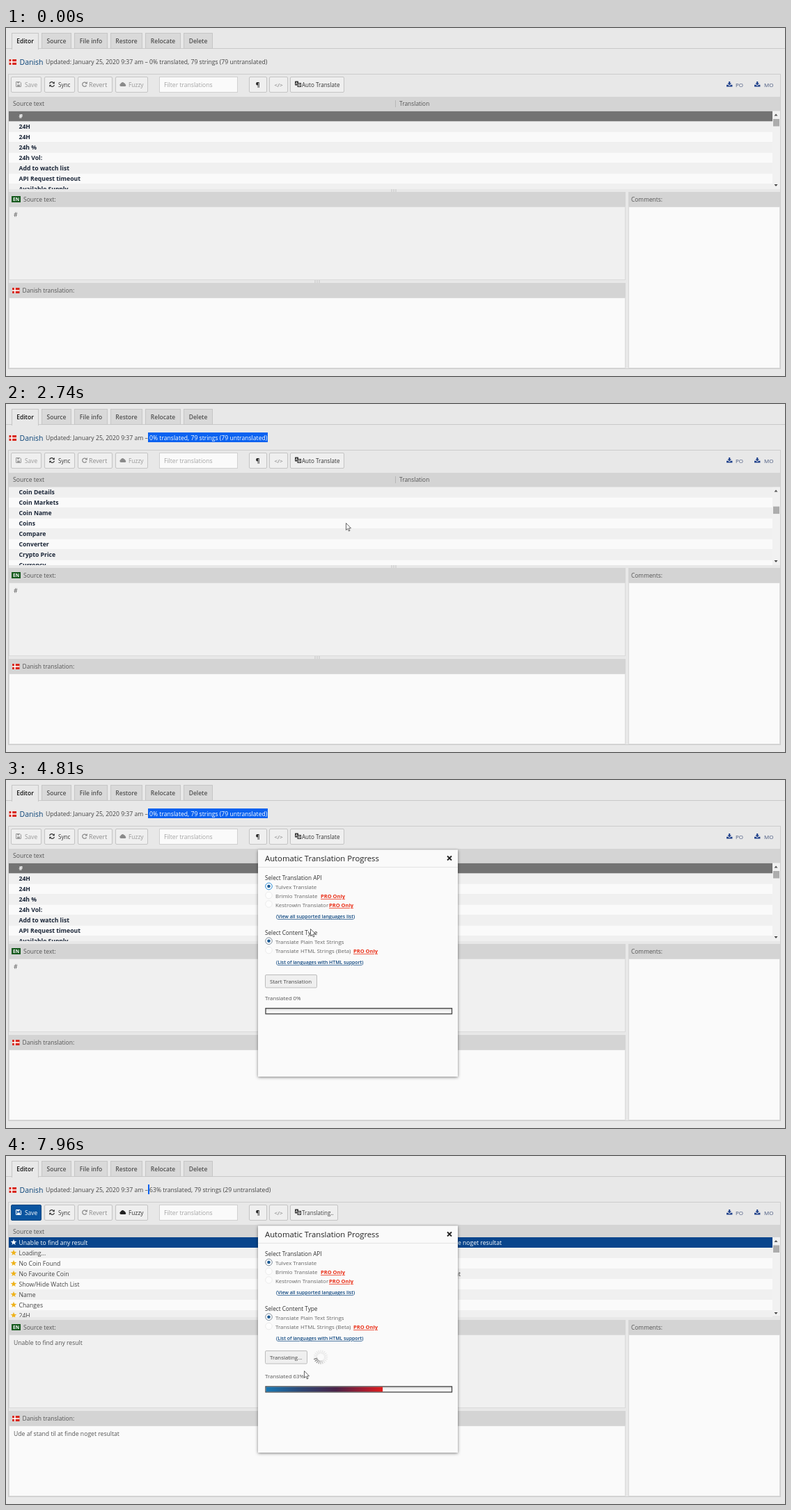
An HTML page for the animation above (8 s loop, 1119 by 501 pixels).

```html
<!DOCTYPE html>
<html lang="en">
<head>
<meta charset="utf-8">
<title>Translation editor</title>
<style>
  html, body { margin: 0; width: 100%; height: 100%; overflow: hidden; background: #e8e8e8; }
  svg { display: block; width: 1119px; height: 501px; font: 8.65px "Open Sans", "Noto Sans", sans-serif; fill: #555; }
  .b { font-weight: 700; fill: #1a2537; }
  .pro { font: 700 7.5px "Open Sans", sans-serif; fill: #ea2c14; text-decoration: underline; }
  .link { font-weight: 600; font-size: 6.9px; fill: #0b457f; }
  .link tspan { text-decoration: underline; }
  .opt { font-size: 7.95px; fill: #666; }
  .cap { font-size: 8.2px; fill: #333; }
</style>
</head>
<body>
<svg id="stage" viewBox="0 0 1119 501" xmlns="http://www.w3.org/2000/svg"></svg>
<script>
const LOOP = 8000, STEP = 70;
const CLICK = 3610, POPUP = 3740, START = 5470, BUSY = 5540, DONE = 6650;

const text = (x, y, s, attrs = '') => `<text x="${x}" y="${y}" ${attrs}>${s}</text>`;
const fill = (x, y, w, h, c, attrs = '') => `<rect x="${x}" y="${y}" width="${w}" height="${h}" fill="${c}" ${attrs}/>`;
const box = (x, y, w, h, c, line, attrs = '') =>
  fill(x + .5, y + .5, w - 1, h - 1, c, `stroke="${line}" ${attrs}`);
const path = (d, attrs) => `<path d="${d}" ${attrs}/>`;
const group = (id, ...parts) => `<g id="${id}">${parts.join('')}</g>`;
const at = (x, y, ...parts) => `<g transform="translate(${x} ${y})">${parts.join('')}</g>`;
const line = (c, w = 1) => `fill="none" stroke="${c}" stroke-width="${w}"`;

// icons
const flag = (x, y) => at(x, y, fill(0, 0, 10.5, 8, '#d8281c'),
  fill(3, 0, 1.6, 8, '#fff'), fill(0, 3.2, 10.5, 1.6, '#fff'));
const disk = (x, y, c) => at(x, y,
  path('M.5 .5H6L7.5 2V7.5H.5Z', line(c)), fill(2, .5, 3, 2, c), fill(2, 4.5, 4, 3, c));
const cycle = (x, y, c) => at(x, y,
  path('M.6 3.2A3.2 3.2 0 0 1 6.4 2M7.4 4.8A3.2 3.2 0 0 1 1.6 6', line(c, 1.2)),
  path('M7.8 0V3.2H4.6ZM.2 8V4.8H3.4Z', `fill="${c}"`));
const undo = (x, y, c) => at(x, y,
  path('M6.6 5.6A3.1 3.1 0 1 1 6 1.9', line(c, 1.2)), path('M7.8 0V3.4H4.4Z', `fill="${c}"`));
const cloud = (x, y, c) => at(x, y,
  path('M2 7A2 2 0 0 1 1.6 3.2A2.8 2.8 0 0 1 6.6 2.3A2 2 0 0 1 8.4 4A1.6 1.6 0 0 1 8 7Z', `fill="${c}"`));
const lang = (x, y) => at(x, y, fill(0, 0, 5, 6, '#333', 'rx=".6"'),
  path('M1.2 4.6L2.5 1.4L3.8 4.6M1.7 3.6H3.3', line('#fff', .7)),
  box(3.5, 2.5, 5.5, 6, '#f4f4f4', '#333'), path('M5 4.6H7.6M5 7L7 4.6M5.4 5.2L7.4 7', line('#333', .7)));
const download = (x, y) => at(x, y,
  path('M3.2 0H5.2V2.6H7L4.2 5.4L1.4 2.6H3.2ZM0 4.8H2L4.2 6.6L6.4 4.8H8.4V7.6H0Z', 'fill="#1d3f8a"'));
const star = (x, y, c) => {
  const pts = Array.from({ length: 10 }, (_, i) => {
    const a = i * Math.PI / 5, r = i % 2 ? 1.9 : 4.6;
    return (x + r * Math.sin(a)).toFixed(2) + ',' + (y - r * Math.cos(a)).toFixed(2);
  });
  return `<polygon points="${pts.join(' ')}" fill="${c}"/>`;
};

const tab = ([name, x, w], i) =>
  box(x, 7, w, i ? 23 : 24, i ? '#d9d9d9' : '#e8e8e8', '#c6c6c6') +
  (i ? '' : fill(x + 1, 29, w - 2, 2, '#e8e8e8')) +
  text(x + w / 2, 21.5, name, `text-anchor="middle" font-weight="600" font-size="8.5" fill="${i ? '#505050' : '#111'}"`);
const tabs = [['Editor', 8, 39], ['Source', 51, 43], ['File info', 98, 48],
  ['Restore', 150, 46], ['Relocate', 200, 51], ['Delete', 255, 42]];

const button = (x, w, attrs = '') => box(x, 70, w, 23, '#efefef', '#c4c4c4', `rx="1.5" ${attrs}`);
const label = (x, s, c = '#333', size = 8.4) => text(x, 85, s, `font-size="${size}" fill="${c}"`);

const titleHead = 'Updated: January 25, 2020 9:37 am – ';
const titleText = (id, s, attrs) => text(57, 52, titleHead + s, `id="${id}" ${attrs}`);

const words = ['#', '24H', '24H', '24h %', '24h Vol:', 'Add to watch list', 'API Request timeout',
  'Available Supply', 'Bid', 'Change', 'Changes', 'Chart', 'Circulating Supply', 'Close', 'Coin',
  'Coin Details', 'Coin Markets', 'Coin Name', 'Coins', 'Compare', 'Converter', 'Crypto Price',
  'Currency', 'Currency Not Found', 'Date', 'down', 'Enter Amount', 'Entries', 'Exchanges', 'Explorer',
  'Fernhill', 'Fiat Price', 'From', 'Global Data', 'High', 'Historical Data', 'Last Updated', 'Loading...', 'Low'];
const row = (s, i) => fill(4, 119.5 + i * 15, 1097, 15, i ? (i % 2 ? '#f0f0f0' : '#fafafa') : '#737373') +
  text(18.5, 130 + i * 15, s, `class="b" ${i ? '' : 'style="fill:#fff"'}`);
const results = ['Unable to find any result', 'Loading...', 'No Coin Found', 'No Favourite Coin',
  'Show/Hide Watch List', 'Name', 'Changes', '24H'];
const resultRow = (s, i) => fill(4, 117 + i * 15, 1097, 15, i ? (i % 2 ? '#f0f0f0' : '#fafafa') : '#08458c') +
  star(11, 124.3 + i * 15, i ? '#eeb21a' : '#fff') +
  text(18.5, 127.8 + i * 15, s, `fill="${i ? '#444' : '#fff'}"`);
const danish = 'Ude af stand til at finde noget resultat';

const grip = (x, y) => path(`M${x} ${y}h9M${x} ${y + 2}h9`, 'stroke="#bbb" stroke-width=".8" stroke-dasharray="2 1"');
const bar = (x, y, w) => fill(x, y, w, 21, '#d4d4d4');

const radio = (y, on, id = '') => `<circle cx="377.5" cy="${y}" r="4.8" fill="#fdfdfd" stroke="${on ? '#7e8b98' : '#ececec'}" ${id}/>` +
  (on ? `<circle cx="377.5" cy="${y}" r="2.3" fill="#1d5b94"/>` : '');
const option = (y, s, proX) => text(387, y, s, 'class="opt"') + (proX ? text(proX, y, 'PRO Only', 'class="pro"') : '');
const link = (y, s, id = '') => text(388, y, `(<tspan>${s}</tspan>)`, `class="link" ${id}`);

const spokes = 20;
const spinner = Array.from({ length: spokes }, (_, i) =>
  `<line x1="5" x2="10.3" stroke="#444" stroke-width="1.2" transform="rotate(${i * 360 / spokes})"/>`).join('');

const stage = document.getElementById('stage');
stage.innerHTML = [
  `<defs>
    <clipPath id="listClip"><rect x="4" y="117" width="1108" height="115"/></clipPath>
    <clipPath id="selClip"><rect id="selShape" x="204" y="41" width="0" height="14"/></clipPath>
    <linearGradient id="heat"><stop offset="0" stop-color="#1878b4"/><stop offset=".28" stop-color="#2b4a78"/>
      <stop offset=".6" stop-color="#4a2348"/><stop offset=".85" stop-color="#a81c30"/><stop offset="1" stop-color="#e01c1c"/></linearGradient>
    <linearGradient id="trough" x2="0" y2="1"><stop offset="0" stop-color="#d8d8d8"/><stop offset=".6" stop-color="#fafafa"/></linearGradient>
    <filter id="shade" x="-5%" y="-5%" width="110%" height="110%"><feDropShadow dx="0" dy="1" stdDeviation="2" flood-opacity=".5"/></filter>
  </defs>`,
  fill(0, 0, 1119, 501, '#e8e8e8'),
  fill(0, 29, 1119, 1, '#c9c9c9'), ...tabs.map(tab),

  flag(4.5, 45), text(19.5, 53, 'Danish', 'font-size="10.5" fill="#0b4478"'),
  titleText('title', '0% translated, 79 strings (79 untranslated)', 'fill="#444"'),
  fill(204, 41, 0, 14, '#0a62f0', 'id="sel"'),
  `<g clip-path="url(#selClip)">${titleText('titleSel', '0% translated, 79 strings (79 untranslated)', 'fill="#fff"')}</g>`,

  box(3, 66, 1110, 425, '#e8e8e8', '#cdcdcd'),
  button(7, 44), button(55, 44), button(103, 50), button(157, 47),
  group('toolsOff', disk(14, 77, '#999'), label(27, 'Save', '#999'), cloud(163, 77, '#8a8a8a'), label(176, 'Fuzzy', '#999')),
  group('toolsOn', box(7, 70, 44, 23, '#0a55a0', '#084680', 'rx="1.5"'), disk(14, 77, '#fff'), label(27, 'Save', '#fff'),
    cloud(163, 77, '#222'), label(176, 'Fuzzy')),
  cycle(62, 77, '#333'), label(75, 'Sync', '#333', 8.1), undo(109, 77, '#888'), label(119, 'Revert', '#8c8c8c', 8.8),
  box(220, 70, 113, 23, '#fafafa', '#d0d0d0'), label(227, 'Filter translations', '#a4a4a4', 8.6),
  button(349, 26), text(361.5, 85, '¶', 'text-anchor="middle" font-weight="700" fill="#222"'),
  button(378, 27), text(391.5, 84.5, '&lt;/&gt;', 'text-anchor="middle" font-size="8" fill="#777"'),
  group('auto', button(408, 78, 'id="autoBox"'), label(425, 'Auto Translate', '#333', 8.1)),
  group('autoBusy', button(408, 69), label(425, 'Translating..', '#444', 8.1)),
  lang(415, 76.5),
  download(1035, 77), text(1048, 85, 'PO', 'font-size="8" fill="#4a5a80"'),
  download(1075, 77), text(1089, 85, 'MO', 'font-size="8" fill="#4a5a80"'),

  fill(4, 99, 1108, 20.5, '#d4d4d4'), text(10, 111.5, 'Source text'),
  fill(559, 104, 1, 10, '#b8b8b8'), text(565, 111.5, 'Translation', 'font-size="8.4"'),
  `<g clip-path="url(#listClip)">`,
  `<g id="listBox" style="clip-path:inset(0)"><g id="list">${words.map(row).join('')}</g></g>`,
  group('results', ...results.map(resultRow),
    text(712, 127.8, danish, 'text-anchor="end" fill="#fff"'),
    text(653, 172.8, 'Ingen favorit mønt', 'text-anchor="end" fill="#444"')),
  `</g>`,
  group('headCover', fill(4, 99, 1108, 20.5, '#d4d4d4'), text(10, 111.5, 'Source text'),
    fill(559, 104, 1, 10, '#b8b8b8'), text(565, 111.5, 'Translation', 'font-size="8.4"')),
  fill(1101, 119.5, 11, 113, '#f1f1f1', 'id="track"'),
  path('M1103.5 126.5h5l-2.5-3z', 'id="up" fill="#555"'), path('M1103.5 225h5l-2.5 3z', 'fill="#444"'),
  fill(1102, 131, 9, 10.5, '#adadad', 'id="thumb"'),
  fill(4, 232, 1108, 4, '#e8e8e8'), grip(553, 233),

  bar(4, 236, 886), fill(8, 242, 13, 9, '#14591c'),
  text(14.5, 249, 'EN', 'text-anchor="middle" font-size="6.6" font-weight="700" fill="#fff"'),
  text(25, 249.5, 'Source text:', 'font-size="8.5"'),
  box(4, 257, 886, 106, '#f0f0f0', '#dadada'), text(11, 271.7, '#', 'id="phrase"'),
  grip(443, 364),
  bar(4, 367, 886), flag(9, 374), text(23.5, 381, 'Danish translation:', 'font-size="8.5"'),
  box(4, 388, 886, 102, '#fafafa', '#dadada'), text(11, 403, danish, 'id="answer"'),
  bar(894, 236, 218), text(898, 249.5, 'Comments:', 'font-size="8.4"'),
  box(894, 257, 218, 233, '#fafafa', '#dadada'),

  group('popup',
    fill(362, 100.5, 287, 326.5, '#fafafa', 'filter="url(#shade)"'),
    text(372, 116.5, 'Automatic Translation Progress', 'font-size="11.3" fill="#222"'),
    path('M634 109.5l6 6m0-6l-6 6', line('#222', 1.8)), fill(362, 125, 287, 1, '#e4e4e4'),
    text(372, 144.3, 'Select Translation API', 'class="cap"'),
    radio(153, true, 'id="focus"'), radio(166, false), radio(178.5, false),
    option(157, 'Tulvex Translate'), option(170, 'Brimlo Translate', 452), option(183, 'Kestrowin Translator', 464),
    link(199, 'View all supported languages list'),
    text(372, 223, 'Select Content Type', 'class="cap"'),
    radio(231.7, true), radio(245, false),
    option(236, 'Translate Plain Text Strings'), option(249, 'Translate HTML Strings (Beta)', 499),
    link(265.3, 'List of languages with HTML support', 'id="hot"'),
    box(372, 280, 75, 19.5, '#efefef', '#bdbdbd', 'id="go" rx="1.5"'),
    text(379, 293, 'Start Translation', 'id="goText" font-size="7.85" fill="#444"'),
    `<g id="spin" transform="translate(452 289.5)">${spinner}</g>`,
    group('progress', text(372, 317, 'Translated 0%', 'id="done" font-size="7.9" fill="#555"'),
      fill(373, 328.7, 267.5, 8, 'url(#trough)', 'stroke="#444" stroke-width="1.3"'),
      fill(373.6, 329.3, 167.5, 6.8, 'url(#heat)', 'id="fillBar"'))),

  group('arrow', path('M.5 .5V10.5L2.8 8.4L4.4 12L6 11.3L4.4 7.8H7.5Z', 'fill="#fff" stroke="#444" stroke-width=".8"')),
  group('hand', path('M-.9 1Q0-.6 .9 1V5L5 6Q6 6.4 5.8 8L5 13H-1.2L-4.2 8.6Q-4.4 7-2.6 7.6L-.9 9Z',
    'fill="#fff" stroke="#333" stroke-width=".9"')),
  group('beam', path('M-2-5.5H2M0-5.5V5.5M-2 5.5H2', line('#333', .9))),
].join('');

const $ = id => document.getElementById(id);
const show = (id, on) => { $(id).style.display = on ? '' : 'none'; };
const set = (id, attrs) => { for (const k in attrs) $(id).setAttribute(k, attrs[k]); };
const move = (id, x, y) => set(id, { transform: `translate(${x} ${y})` });
const within = (t, a, b) => t >= a && t < b;

// time, x, y
const pointer = [[0, 591, 204], [210, 591, 204], [280, 223, 62], [420, 105, 15], [630, 196, 48], [700, 205, 48],
  [910, 205, 48], [1400, 374, 48], [1610, 382, 48], [1820, 382, 48], [1960, 440, 118], [2100, 488, 171],
  [3150, 488, 171], [3290, 462, 90], [3430, 460, 87], [4060, 460, 87], [4200, 457, 108], [4480, 446, 170],
  [4760, 437, 214], [4900, 437, 214], [5040, 440, 258], [5180, 428, 286], [5250, 424, 289], [5600, 424, 289],
  [5880, 427, 300], [6160, 426, 305], [6860, 426, 305], [7140, 428, 309], [LOOP, 428, 309]];
// time, offset
const scroll = [[0, 0], [2030, 0], [2170, 130], [2310, 345.5], [2450, 415], [2590, 415],
  [2660, 340], [2800, 110], [2940, 0], [LOOP, 0]];

function along(track, t) {
  const i = track.findIndex(k => k[0] > t), a = track[i - 1], b = track[i];
  const p = (t - a[0]) / (b[0] - a[0]);
  return a.slice(1).map((v, n) => v + (b[n + 1] - v) * p);
}

function drawPointer(t, x, y) {
  const kind = within(t, 630, 1830) ? 'beam'
    : within(t, 3290, 4130) || within(t, 5040, 5110) || within(t, 5180, 5810) ? 'hand' : 'arrow';
  const seen = within(t, 80, 100) || t >= 280;
  for (const id of ['arrow', 'hand', 'beam']) show(id, seen && id === kind);
  move(kind, x, y);
}

function draw(t) {
  const q = t - t % STEP, done = t >= DONE, busy = t >= BUSY;
  const [x, y] = along(pointer, q), [offset] = along(scroll, q);
  drawPointer(t, x, y);

  const width = done ? 2 : t < 960 ? 0 : t >= 1550 ? 172 : Math.max(0, Math.min(172, x - 205));
  set('sel', { width });
  set('selShape', { width });
  const status = done ? '63% translated, 79 strings (29 untranslated)' : '0% translated, 79 strings (79 untranslated)';
  $('title').textContent = $('titleSel').textContent = titleHead + status;

  move('list', 0, -offset);
  show('listBox', !done);
  show('headCover', !done);
  show('results', done);
  const top = done ? -2.5 : 0;
  set('track', { y: 119.5 + top });
  move('up', 0, top);
  set('thumb', { y: 131 + top + offset * .0737 });

  show('toolsOff', !done);
  show('toolsOn', done);
  show('auto', !busy);
  show('autoBusy', busy);
  set('autoBox', { stroke: within(t, 3250, 4130) ? '#777' : '#c4c4c4', fill: within(t, CLICK, POPUP) ? '#e4e4e4' : '#efefef' });
  $('phrase').textContent = done ? results[0] : '#';
  show('answer', done);

  show('popup', t >= POPUP);
  set('focus', { stroke: t < START ? '#2f8fd8' : '#7e8b98' });
  $('hot').style.fill = within(t, 5040, 5110) ? '#2a86c8' : '';
  set('go', {
    width: busy ? 60 : 74,
    stroke: within(t, START, DONE) ? '#1a80c4' : within(t, 5180, START) ? '#888' : '#bdbdbd',
    'stroke-width': within(t, START, DONE) ? 1.5 : 1,
  });
  $('goText').textContent = busy ? 'Translating...' : 'Start Translation';
  $('done').textContent = done ? 'Translated 63%' : 'Translated 0%';
  move('progress', 0, busy ? 3.2 : 0);
  show('fillBar', done);

  show('spin', busy);
  const head = 130 + (q - 6370) * .266;
  [...$('spin').children].forEach((s, i) => {
    const lag = (((head - i * 360 / spokes) % 360) + 360) % 360;
    s.setAttribute('stroke-opacity', Math.max(.1, .9 * (1 - lag / 150)));
  });
}

const begin = performance.now();
function tick() {
  draw((performance.now() - begin) % LOOP);
  requestAnimationFrame(tick);
}
tick();
</script>
</body>
</html>
```
